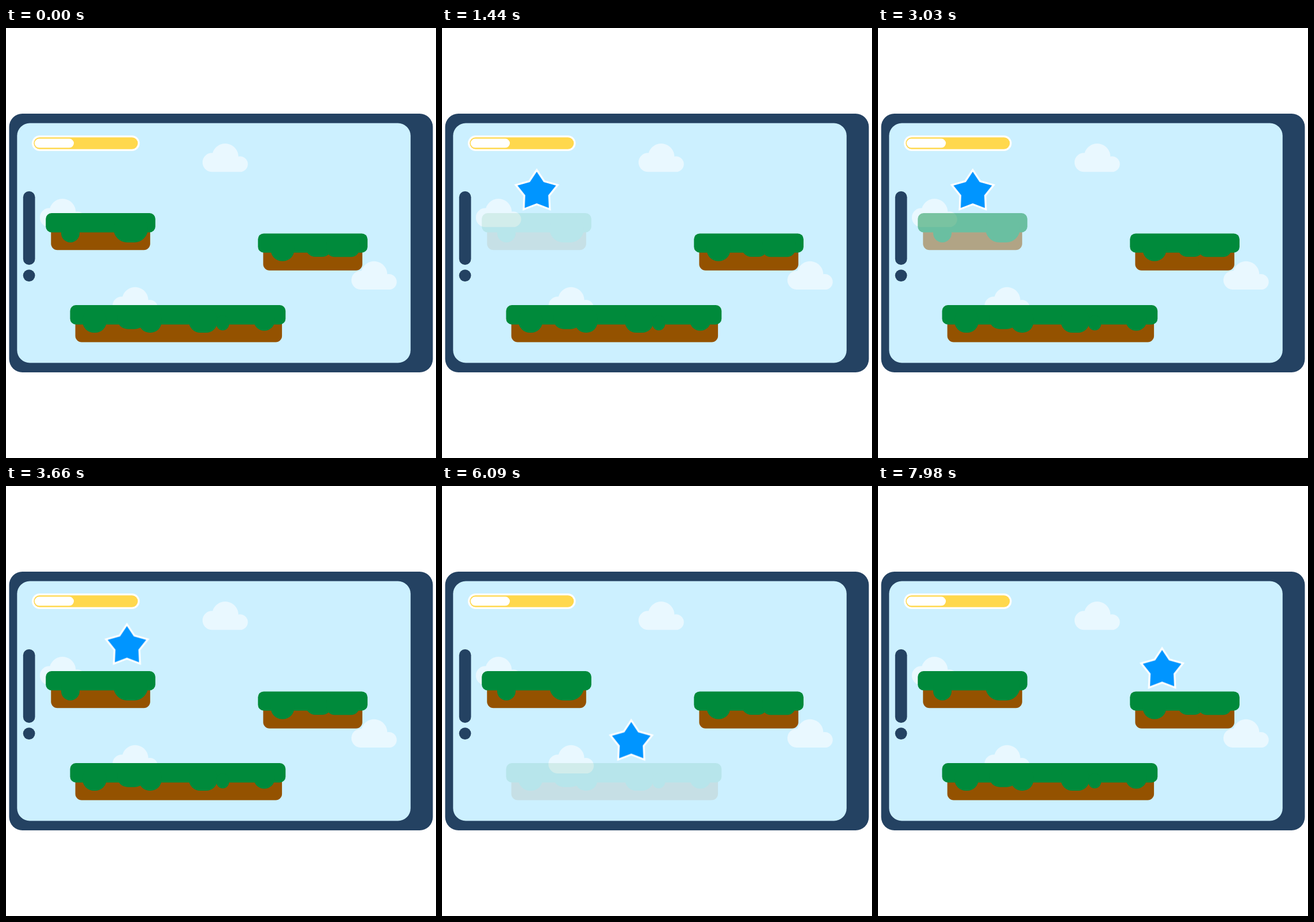
Write an HTML page that moves like this. It is 748x748 px and loops after 8000 ms.

```html
<!DOCTYPE html>
<html lang="en">
<head>
<meta charset="utf-8">
<title>Fading platforms</title>
<style>
  html, body { margin: 0; width: 100%; height: 100%; overflow: hidden; background: #fff; }
  body { position: relative; }
  svg { display: block; position: absolute; left: 0; top: 0; }
  .scene { width: 748px; height: 748px; }
  .navy { fill: #244262; }
  .sky { fill: #ccf0ff; }
  .cloud { fill: #e9f8ff; }
  .grass { fill: #008a3b; }
  .soil { fill: #945200; }

  .fade { --ease: cubic-bezier(.37, 0, .63, 1); animation: 8s var(--ease) infinite; }
  .left { animation-name: blink; }
  .bottom { animation-name: dip; }
  @keyframes blink {
    0%, 8.25%, 25.125%, 42%, 100% { opacity: 1; }
    15.75%, 17.625%, 32.625%, 34.5% { opacity: .09; }
  }
  @keyframes dip {
    0%, 56.44%, 90%, 100% { opacity: 1; }
    71.44%, 75.19% { opacity: .09; }
  }

  .star {
    width: 100px; height: 100px; overflow: visible;
    offset-rotate: 0deg;
    animation: track 8s step-end infinite,
               appear 8s linear infinite,
               jump 8s cubic-bezier(.37, 0, .63, 1) infinite;
  }
  /* One arc per jump, swapped while the star rests. */
  @keyframes track {
    0% { offset-path: path("M164.8 282C219.5 262.9 274.3 272.7 329.2 442.5"); }
    60%, 100% { offset-path: path("M329.2 442.5Q411.7 252.5 494.4 317.5"); }
  }
  @keyframes appear {
    0%, 2.25% { opacity: 0; }
    5.625%, 100% { opacity: 1; }
  }
  @keyframes jump {
    0%, 42% { offset-distance: 0%; }
    55.5%, 59.999% { offset-distance: 100%; }
    60%, 90% { offset-distance: 0%; }
    100% { offset-distance: 100%; }
  }
</style>
</head>
<body>
<svg class="scene" viewBox="0 0 748 748">
  <defs>
    <path id="cloud" d="M16 49A16 16 0 1 1 18 16.2A23 23 0 0 1 63 22.3A13.5 13.5 0 1 1 68.5 49Z"/>
  </defs>

  <rect class="navy" x="5.5" y="149" width="737" height="450" rx="23"/>
  <rect class="sky" x="19.3" y="165.5" width="684.5" height="417" rx="22"/>
  <rect class="navy" x="29.8" y="284" width="20.7" height="128" rx="10.3"/>
  <circle class="navy" cx="40.1" cy="430.6" r="10.4"/>

  <g class="cloud">
    <use href="#cloud" x="341.3" y="201.2"/>
    <use href="#cloud" x="58.3" y="297.2"/>
    <use href="#cloud" x="184.6" y="451"/>
    <use href="#cloud" x="600.3" y="406"/>
  </g>

  <rect x="45" y="187" width="187.5" height="27" rx="13.5" fill="#fff"/>
  <rect x="48.3" y="190.3" width="181" height="20.4" rx="10.2" fill="#ffd84d"/>
  <rect x="49.8" y="192.6" width="68.2" height="15.6" rx="7.8" fill="#fff"/>

  <g class="fade left">
    <rect class="soil" x="78.3" y="336" width="172.5" height="50.3" rx="11"/>
    <g class="grass">
      <rect x="69.2" y="322" width="190.6" height="33.4" rx="10"/>
      <rect x="96" y="335" width="32" height="38" rx="16"/>
      <rect x="187" y="325" width="60" height="48" rx="24"/>
    </g>
  </g>

  <g>
    <rect class="soil" x="447.4" y="372" width="172.5" height="49.7" rx="11"/>
    <g class="grass">
      <rect x="438.3" y="357.4" width="190.6" height="33.4" rx="10"/>
      <rect x="460.5" y="364" width="41" height="41.5" rx="20"/>
      <rect x="521" y="362" width="46" height="36" rx="17"/>
      <rect x="557" y="362" width="58" height="36.3" rx="15"/>
    </g>
  </g>

  <g class="fade bottom">
    <rect class="soil" x="120.6" y="498" width="359.5" height="48.5" rx="11"/>
    <g class="grass">
      <rect x="111.5" y="482" width="374.8" height="33.8" rx="10"/>
      <rect x="133" y="488" width="42" height="42" rx="20"/>
      <rect x="193" y="486" width="50" height="37.7" rx="19"/>
      <rect x="231" y="488" width="39.5" height="42" rx="19"/>
      <rect x="318" y="488" width="50" height="42" rx="20"/>
      <rect x="366" y="500" width="22" height="26" rx="11"/>
      <rect x="431" y="488" width="36.5" height="38.5" rx="18"/>
    </g>
  </g>
</svg>

<svg class="star" viewBox="-50 -50 100 100">
  <path d="M0-32L12-14L33.5-8L20 9L21 31L0 23L-21 31L-20 9L-33.5-8L-12-14Z"
        fill="#0095ff" stroke="#fff" stroke-width="6.6" stroke-miterlimit="8" paint-order="stroke"/>
</svg>
</body>
</html>
```
